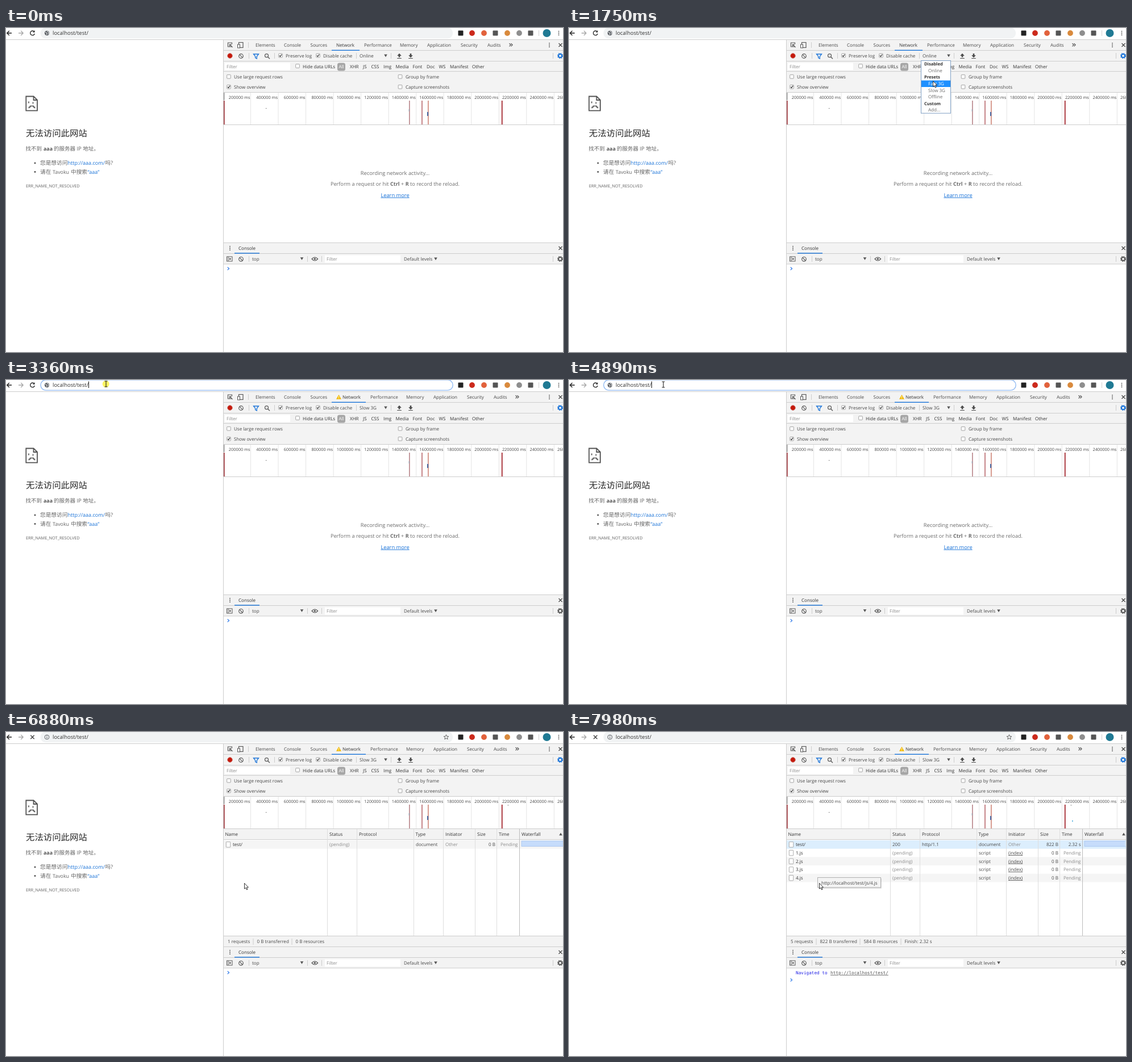
Recreate the animation shown at these times as an HTML page. Size 980 px wide and 571 px high, loop 8 s.

```html
<!DOCTYPE html>
<html lang="zh-CN">
<head>
<meta charset="utf-8">
<title>Network throttling</title>
<style>
html, body { margin: 0; width: 100%; height: 100%; overflow: hidden; background: #fff; }
svg { display: block; }
text { font-family: "Open Sans", "Noto Sans", "Noto Sans CJK SC", sans-serif; white-space: pre; text-rendering: geometricPrecision; }
.mono { font-family: "DejaVu Sans Mono", monospace; }
</style>
</head>
<body>
<svg id="stage" width="980" height="571" viewBox="0 0 980 571"></svg>
<script>
const LOOP = 8000;
const INK = '#484848', GREY = '#8c8c8c', BLUE = '#1a73d8', BAR = '#f3f3f3', EDGE = '#cdcdcd';

// y is the middle of the capitals
const T = (x, y, s, { size = 8.05, fill = INK, anchor = 'start', more = '' } = {}) =>
  `<text x="${x}" y="${y + size * .36}" font-size="${size}" fill="${fill}" text-anchor="${anchor}" ${more}>${s}</text>`;
const R = (x, y, w, h, fill, more = '') =>
  `<rect x="${x}" y="${y}" width="${w}" height="${h}" fill="${fill}" ${more}/>`;
const P = (d, stroke = '#5a5a5a', w = 1, fill = 'none') =>
  `<path d="${d}" stroke="${stroke}" stroke-width="${w}" fill="${fill}"/>`;
const C = (x, y, r, fill, stroke = 'none', w = 1, more = '') =>
  `<circle cx="${x}" cy="${y}" r="${r}" fill="${fill}" stroke="${stroke}" stroke-width="${w}" ${more}/>`;
const G = (id, ...parts) => `<g id="${id}">${parts.join('')}</g>`;
const H = (y, x1 = 382, x2 = 980) => P(`M${x1} ${y}H${x2}`, EDGE);
const V = (x, y1, y2, c = EDGE) => P(`M${x} ${y1}V${y2}`, c);
const BOLD = 'font-weight="700"', LINED = 'text-decoration="underline"';

const dots = (x, y) => [-3.2, 0, 3.2].map(d => C(x, y + d, .9, '#444')).join('');
const cross = (x, y, r = 3, w = 1.2) =>
  P(`M${x - r} ${y - r}l${2 * r} ${2 * r}m0 ${-2 * r}l${-2 * r} ${2 * r}`, '#444', w);
const down = (x, y) => P(`M${x - 2.8} ${y - 2.3}h5.6l-2.8 4.8z`, 'none', 0, '#555');
const gear = (x, y, c) => C(x, y, 3, 'none', c, 2) + C(x, y, 4.4, 'none', c, 1.3, 'stroke-dasharray="1.73"');
const clear = (x, y) => C(x, y, 3.8, 'none', '#5a5a5a', 1.2) + P(`M${x - 2.7} ${y - 2.7}l5.4 5.4`, '#5a5a5a', 1.2);
const check = (x, y, on) => R(x - 3.3, y - 3.3, 6.6, 6.6, '#fff', 'stroke="#8f8f8f" stroke-width=".8" rx=".8"') +
  (on ? P(`M${x - 2} ${y}l1.5 1.8l2.7-3.8`, '#333', 1.2) : '');
const page = (x, y) => R(x - 3.7, y - 4.7, 7.4, 9.4, '#fff', 'stroke="#999" stroke-width=".8" rx=".6"');

function browserBar() {
  const icons = [[800, '#222', 1], [820, '#cc2a1c'], [841, '#e2623c'], [861, '#555', 1],
    [882, '#d98a3d'], [903, '#8e8e8e'], [923, '#555', 1]];
  return P('M10 9H2M5.8 5L1.8 9l4 4', '#222', 1.4) + P('M22 9h8M26.2 5l4 4l-4 4', '#a8a8a8', 1.3) +
    R(60.5, -.5, 725.7, 18.9, '#f1f3f4', 'rx="9.4"') + H(20.5, 0) +
    G('focus', R(61, -.2, 725.2, 18.3, '#fff', 'rx="9.1" stroke="#93bcf3" stroke-width="1.4"')) +
    G('reload', P('M49.4 6.2A3.9 3.9 0 1 0 50.4 10', '#333', 1.4) + P('M50.6 4v3.8h-3.8z', 'none', 0, '#333')) +
    G('globe', C(72, 9, 4.2, '#5f6368') + P('M69 7.5l2.5 1l.5 2.3l-1.2 1.6M72 5.5l2 1.3l1.4 2.2l-1.6 2', '#f1f3f4', 1)) +
    G('loading', cross(46.5, 9, 3.2, 1.4), C(72, 9, 3.9, 'none', '#5f6368', 1), P('M72 8.3v3M72 6.3v1.1', '#5f6368', 1.1),
      P('M774.5 4.7l1.2 2.9l3.1.2l-2.4 2l.8 3l-2.7-1.7l-2.7 1.7l.8-3l-2.4-2l3.1-.2z', '#555', .9)) +
    G('picked', R(82, 2.5, 63.5, 12.5, '#0078d7')) +
    T(82, 9, 'localhost/test/', { size: 9.45, more: 'id="url"' }) +
    G('caret', P('M145.5 2.5V14', '#111', 1)) +
    icons.map(([x, c, sq]) => sq ? R(x - 4.5, 4.5, 9, 9, c, 'rx="1"') : C(x, 9, 4.9, c)).join('') +
    V(937.5, 4, 14, '#d0d0d0') + C(951.5, 9, 7, '#207a94') + dots(972.5, 9);
}

function errorPage() {
  const body = (x, y, s, more = '', fill = '#646464', size = 9.5) => T(x, y, s, { size, fill, more });
  return G('error',
    P('M35.3 120.5H48.5L55 126.8V145.6H35.3Z', '#535353', 1.8) + P('M48.5 120.5V127H55', '#535353', 1.8) +
    P('M40 129.5v3M47.5 130.5v3M40.5 141.5v-2h2v-2h6v2h2v2', '#535353', 1.6),
    T(35, 185.8, '无法访问此网站', { size: 15.4, fill: '#282828' }),
    body(34.5, 213, '找不到') + body(66, 213, 'aaa', BOLD, '#555', 8.8) + body(84, 213, '的服务器 IP 地址。'),
    C(51, 238, 1.5, '#555') + C(51, 253.5, 1.5, '#555'),
    body(60, 238, '您是想访问', '', '#646464', 9.7) + body(108.5, 238, 'http://aaa.com/', '', BLUE, 9.05) + body(174.5, 238, '吗?'),
    body(60, 253.5, '请在', '', '#646464', 9.7) + body(82, 253.5, 'Tavoku', '', '#646464', 8.9) + body(114, 253.5, '中搜索', '', '#646464', 9.7) +
    body(143.5, 253.5, '“aaa”', '', BLUE, 9),
    T(35, 278, 'ERR_NAME_NOT_RESOLVED', { size: 7.34, fill: '#646464' }));
}

function tabs(id, shift) {
  const names = [[630, 'Performance'], [693, 'Memory'], [741, 'Application'], [800, 'Security'], [847, 'Audits']];
  const warn = P('M585.5 26.4l4 7.2h-8z', '#f0b400', .6, '#f4bd00') + P('M585.5 28.6v2.4m0 .7v1', '#fff', .9);
  return G(id, T(581 + shift, 30, 'Network', { fill: '#333' }), R(573, 38.6, 49 + shift, 1.4, BLUE),
    names.map(([x, s]) => T(x + shift, 30, s)).join(''),
    P(`M${885.5 + shift} 27.2l2.6 2.6l-2.6 2.6m3-5.2l2.6 2.6l-2.6 2.6`, '#444', 1.1),
    shift ? warn : '', T(622, 49, shift ? 'Slow 3G' : 'Online'));
}

function tools() {
  const kinds = [[605, 'XHR'], [628, 'JS'], [642.5, 'CSS'], [664, 'Img'], [685.5, 'Media'], [715.5, 'Font'],
    [740, 'Doc'], [761.5, 'WS'], [781, 'Manifest'], [820, 'Other']];
  return R(382, 21, 598, 92, BAR) + H(39.5) + H(58.5) + H(76.5) +
    P('M397 33h-6.5v-7h7v2.5M393.5 29l5 5m-5-1.5V29h3.5', '#5a5a5a', 1.2) +
    R(409.5, 25.5, 7.5, 9, 'none', 'stroke="#5a5a5a" stroke-width="1.2"') + R(407.5, 29, 4, 6, BAR, 'stroke="#5a5a5a"') +
    V(426.5, 25, 35) + T(439, 30, 'Elements') + T(489, 30, 'Console') + T(535.5, 30, 'Sources') +
    tabs('online', 0) + tabs('throttled', 11) + dots(956, 30) + cross(975.5, 30) +
    C(394, 49, 4.4, '#c4190c', '#d9928c', 1) + clear(413.5, 49.5) + V(427.5, 44, 54) +
    P('M435.5 46h9l-3.2 4v4l-2.6-1.4V50z', BLUE, 1.3) +
    C(458.5, 48.7, 3, 'none', '#5a5a5a', 1.2) + P('M460.7 51l3.3 3.3', '#5a5a5a', 1.4) + V(472.5, 44, 54) +
    check(483, 48.5, 1) + T(492, 49, 'Preserve log') + check(549, 48.5, 1) + T(558, 49, 'Disable cache') +
    V(616.5, 44, 54) + down(668, 48.7) + V(677.5, 44, 54) +
    P('M688.2 49l3.8-4.2l3.8 4.2h-2.5v2.5h-2.6V49zM688.2 53h7.6v1h-7.6z', 'none', 0, '#4a4a4a') +
    P('M708.2 48l3.8 4.2l3.8-4.2h-2.5v-3h-2.6v3zM708.2 53h7.6v1h-7.6z', 'none', 0, '#4a4a4a') +
    V(962.5, 44, 54) + gear(975, 49, BLUE) +
    R(385, 61.5, 115, 12.5, '#fff') + T(388, 68.5, 'Filter', { fill: GREY }) +
    check(513, 67) + T(522, 68.5, 'Hide data URLs', { fill: '#333' }) +
    R(583, 61.5, 14, 14, '#a6a6a6', 'rx="3.5"') + T(590, 68.5, 'All', { fill: '#fff', anchor: 'middle' }) +
    kinds.map(([x, s]) => T(x, 68.5, s, { fill: '#333' })).join('') +
    check(392, 85.7) + T(401, 86.5, 'Use large request rows') + check(693.5, 85.7) + T(703, 86.5, 'Group by frame') +
    check(392, 103.7, 1) + T(401, 104.5, 'Show overview') + check(693.5, 103.7) + T(703, 104.5, 'Capture screenshots');
}

function overview() {
  let s = H(113.5);
  for (let i = 0; i < 13; i++) {
    const x = 430.5 + 48.53 * i;
    s += V(x, 114, 170, '#e4e4e4') + T(x - 1, 122.5, `${2 + 2 * i}00000 ms`, { size: 7.4, anchor: 'end' });
  }
  return s + R(382.5, 114, 2, 13, '#999') + R(383, 128, 1.7, 42, '#a33c42') +
    R(457, 141, 1.3, 1.3, '#777') + R(709.3, 128, 1.2, 42, '#a05a60') + R(708.7, 143, 1, 4, '#8aa0b0') +
    R(731.3, 128, 1.3, 42, '#a8474b') + R(742.3, 128, 1.2, 42, '#bd5a48') + R(741, 148, 2, 7, '#46639c') +
    R(871.8, 128, 1.9, 42, '#a8323a') +
    G('mark', R(882, 128.5, 3, 1, '#a5a5a5')) + G('dot', R(885, 156, 1.7, 1.7, '#2b9fd8')) + H(170.5);
}

function idle() {
  const line = (y, s, fill = '#6c6c6c', more = '') => T(684.5, y, s, { size: 9.3, fill, anchor: 'middle', more });
  const b = s => `<tspan ${BOLD}>${s}</tspan>`;
  return G('idle', line(256, 'Recording network activity...'),
    T(684.5, 275, `Perform a request or hit ${b('Ctrl')} + ${b('R')} to record the reload.`, { size: 9.15, fill: '#6c6c6c', anchor: 'middle' }),
    line(294.3, 'Learn more', BLUE, LINED));
}

function row(i, name, [status, protocol, type, starter, size, time]) {
  const y = 198.4 + 14.7 * i, wait = status !== '200', grey = { fill: GREY };
  return page(391, y) + T(399, y, name, { fill: '#333' }) + T(569, y, status, wait ? grey : {}) + T(621, y, protocol) +
    T(721, y, type) + T(773, y, starter, starter === 'Other' ? grey : { more: LINED }) +
    T(861, y, size, { anchor: 'end' }) + T(900.5, y, time, { anchor: 'end', fill: wait ? GREY : INK });
}

function requests() {
  const heads = [[385.5, 'Name'], [569, 'Status'], [621, 'Protocol'], [720.5, 'Type'], [773, 'Initiator'],
    [829, 'Size'], [867, 'Time'], [907, 'Waterfall']];
  const stripe = (i, c) => R(383, 191 + 14.7 * i, 597, 14.7, c);
  const totals = (...parts) => parts.map(([x, s], i) =>
    T(x, 369.5, s) + (i ? V(x - 6.5, 364, 375) : '')).join('');
  const scripts = [1, 2, 3, 4].map(i =>
    row(i, `${i}.js`, ['(pending)', '', 'script', '(index)', '0 B', 'Pending'])).join('');
  return G('list', R(383, 171, 597, 18, BAR) + H(189.5),
    G('rowsA', stripe(0, '#f5f5f5')), G('rowsB', stripe(0, '#dceefd'), stripe(2, '#f5f5f5'), stripe(4, '#f5f5f5')),
    [565.5, 617.5, 717.5, 769.5, 825.5, 863.5].map(x => V(x, 171, 359, '#dedede')).join('') + V(903.5, 171, 359, '#bdbdbd'),
    heads.map(([x, s]) => T(x, 180, s, { fill: '#333' })).join(''), P('M973.2 182.3h5.6l-2.8-4.8z', 'none', 0, '#555'),
    R(907, 192, 74, 9.5, '#c6dcfb', 'stroke="#a3c2f0" stroke-width=".8"'),
    R(382.5, 359, 598, 19, BAR) + H(359.5),
    G('pending', row(0, 'test/', ['(pending)', '', 'document', 'Other', '0 B', 'Pending']),
      totals([390, '1 requests'], [441.5, '0 B transferred'], [509.5, '0 B resources'])),
    G('done', row(0, 'test/', ['200', 'http/1.1', 'document', 'Other', '822 B', '2.32 s']), scripts, R(978.3, 192, 1.7, 9.5, '#dceefd'),
      totals([390, '5 requests'], [441.5, '822 B transferred'], [518.5, '584 B resources'], [590.5, 'Finish: 2.32 s'])));
}

function drawer() {
  const mono = (x, s, fill, more = '') => T(x, 424.5, s, { size: 7.7, fill, more: `class="mono" ${more}` });
  return R(382, 378, 598, 38, BAR) + H(378.5) + H(397.5) + H(416) +
    dots(394, 388) + T(409, 388, 'Console', { fill: '#333' }) + R(402, 396.2, 44, 1.4, BLUE) + cross(975.5, 388) +
    R(388.5, 403, 9.5, 8, 'none', 'stroke="#5a5a5a"') + P('M391 403v8', '#5a5a5a') + P('M393 405l3.6 2l-3.6 2z', 'none', 0, '#5a5a5a') +
    clear(413.5, 407.3) + V(427.5, 402, 412) + T(433, 407.3, 'top') + down(520.5, 406.5) + V(530.5, 402, 412) +
    P('M538 407q5.3-6 10.6 0q-5.3 6-10.6 0z', '#5a5a5a', 1.2) + C(543.3, 407, 1.7, '#5a5a5a') + V(555.5, 402, 412) +
    R(561, 400.5, 133, 13, '#fff') + T(564, 407.5, 'Filter', { fill: GREY }) +
    T(700, 407.3, 'Default levels') + down(756, 406.7) + V(962.5, 402, 412) + gear(975, 407, '#5a5a5a') +
    G('log', mono(399, 'Navigated to', '#2222e6'), mono(460, 'http://localhost/test/', '#545454', LINED)) +
    G('prompt', P('M389.7 -2.5l2.8 2.5l-2.8 2.5', '#3b82ea', 1.3));
}

const options = ['Disabled', 'Online', 'Presets', 'Fast 3G', 'Slow 3G', 'Offline', 'Custom', 'Add...'];
const rowH = 11.55, menuTop = 57.8;
const isHead = i => i === 0 || i === 2 || i === 6;
const menu = () => G('menu', R(619.5, 57.5, 52, 92.7, '#fff', 'stroke="#7f9fc4"'),
  R(620, 0, 51, rowH, '#1e90ff', 'id="hover"'),
  options.map((s, i) => T(isHead(i) ? 625 : 632, menuTop + rowH * (i + .5), s,
    isHead(i) ? { size: 7.6, fill: '#333', more: `${BOLD} class="opt"` } : { fill: '#6a6a6a', more: 'class="opt"' })).join(''));

const pointer = () => G('glow', C(-.3, 0, 6, '#fff23c', 'none', 0, 'opacity=".8"')) +
  G('arrow', P('M.5 .5V10.4L2.8 8.4L4.4 12L6 11.3L4.5 7.8H7.5Z', '#222', .9, '#fff')) +
  G('beam', P('M-2.5 -5H2.5M-2.5 5H2.5M0 -5V5', '#222', 1.1));

const $ = id => document.getElementById(id);
$('stage').innerHTML = R(0, 0, 980, 571, '#fff') + browserBar() + errorPage() + tools() + overview() + idle() +
  requests() + drawer() + V(382.5, 21, 571) + menu() +
  G('tip', R(439, 258, 111, 18, '#000', 'opacity=".12" rx="1"'), R(437.5, 256.5, 111, 17.5, '#f4f4f4', 'stroke="#b0b0b0"'),
    T(444, 266, 'http://localhost/test/js/4.js')) +
  G('mouse', pointer());
const opts = [...document.querySelectorAll('.opt')];

const SENT = 5070, LOADED = 7390;
// visible spans, in pairs of start and end
const spans = {
  online: [0, 2160], throttled: [2160, LOOP], menu: [1280, 2160],
  focus: [3360, SENT], picked: [3510, 3870], caret: [3360, 3510, 3870, 4380, 4890, SENT],
  glow: [1280, 1410, 3360, 3510, 3870, 4020],
  reload: [0, SENT], globe: [0, SENT], loading: [SENT, LOOP], idle: [0, SENT], list: [SENT, LOOP], mark: [SENT, LOOP],
  error: [0, LOADED], pending: [SENT, LOADED], rowsA: [SENT, LOADED],
  done: [LOADED, LOOP], rowsB: [LOADED, LOOP], dot: [LOADED, LOOP], log: [LOADED, LOOP],
  tip: [7520, LOOP], mouse: [260, LOOP]
};
// pointer moves: first step, last step, number of steps, x, y
const moves = [
  [260, 1030, 17, 640, 46], [1550, 1750, 5, 640, 93], [1800, 1930, 4, 640, 108],
  [2160, 2900, 15, 183, 17], [3080, 3130, 2, 176, 7], [3510, 3640, 4, 162, 8.5], [4100, 4200, 3, 166, 8],
  [5860, 5860, 1, 181, 5], [5910, 6650, 17, 605, 385], [6700, 6880, 5, 419, 266],
  [6930, 7480, 13, 427, 249], [7750, 7980, 5, 440, 266]
];

function mouseAt(t) {
  let x = 893, y = 536;
  for (const [from, to, n, tx, ty] of moves) {
    if (t < from) break;
    const step = n > 1 ? (to - from) / (n - 1) : 1;
    const p = Math.min(1, (Math.floor((t - from) / step + 1e-6) + 1) / n);
    const e = p * p * (3 - 2 * p);
    x += (tx - x) * e;
    y += (ty - y) * e;
  }
  return [x, y];
}

const show = (id, on) => { $(id).style.display = on ? '' : 'none'; };

function draw(t) {
  for (const id in spans)
    show(id, spans[id].some((from, i, a) => i % 2 === 0 && t >= from && t < a[i + 1]));
  const [x, y] = mouseAt(t);
  $('mouse').setAttribute('transform', `translate(${x} ${y})`);
  const typing = t > 3000 && y < 16;
  show('beam', typing);
  show('arrow', !typing);
  let hot = Math.max(1, Math.floor((y - menuTop) / rowH));
  if (isHead(hot)) hot--;
  $('hover').setAttribute('y', menuTop + rowH * hot);
  opts.forEach((o, i) => o.setAttribute('fill', i === hot ? '#fff' : isHead(i) ? '#333' : '#6a6a6a'));
  $('url').setAttribute('fill', t >= 3510 && t < 3870 ? '#fff' : '#333');
  $('prompt').setAttribute('transform', `translate(0 ${t < LOADED ? 424 : 437})`);
  $('tip').setAttribute('opacity', t < 7570 ? .5 : 1);
}

const start = performance.now();
function tick() {
  draw((performance.now() - start) % LOOP);
  requestAnimationFrame(tick);
}
tick();
</script>
</body>
</html>
```
